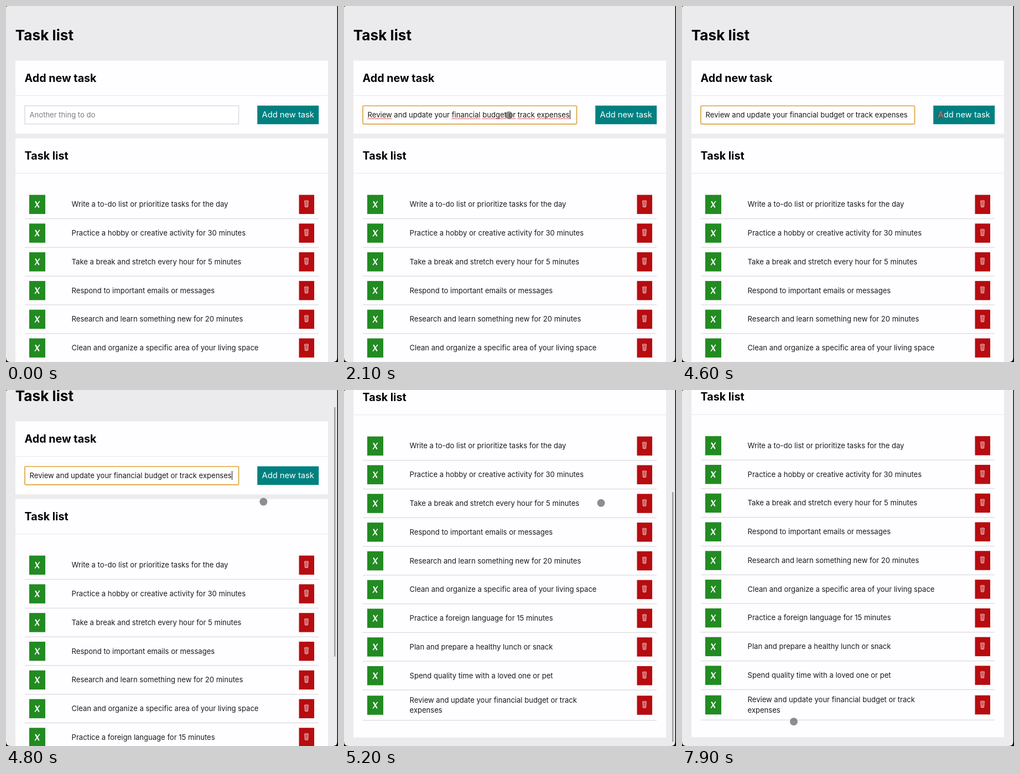
An HTML page for the animation above (8000 ms loop, 600 by 642 pixels).

```html
<!DOCTYPE html>
<html lang="en">
<head>
<meta charset="utf-8">
<title>Task list</title>
<style>
  html, body { margin: 0; width: 100%; height: 100%; overflow: hidden; background: #000; }
  svg { display: block; width: 100%; height: 100%; }
  text { font: 13.05px Inter, Roboto, sans-serif; font-optical-sizing: none; fill: #1a1a1d; white-space: pre; }
  text.h1 { font-size: 26.2px; font-weight: 700; fill: #000; }
  text.h2 { font-size: 19.7px; font-weight: 700; fill: #000; }
  text.btn { font-size: 14.7px; fill: #fff; }
</style>
</head>
<body>
<svg viewBox="0 0 600 642" preserveAspectRatio="none">
  <defs>
    <clipPath id="win"><path d="M3 0H598.6V634Q598.6 642 591 642H8Q0 642 0 634V3Q0 0 3 0Z"/></clipPath>
    <g id="cross" stroke="#fff" stroke-linecap="round" fill="none">
      <path d="M-2.9 -4.8Q-.6 -.6 2.7 4.8" stroke-width="2.3"/>
      <path d="M4 -5.4L-4 5.4" stroke-width="1.6"/>
    </g>
    <g id="bin" fill="none" stroke="#fff" stroke-width=".9" opacity=".85">
      <ellipse cy="-5" rx="3.9" ry="1.1"/>
      <path d="M-3.3 -4L-2.6 5.2Q0 6.2 2.6 5.2L3.3 -4M-1.2 -3L-.9 5M1.2 -3L.9 5"/>
    </g>
  </defs>
  <g clip-path="url(#win)">
    <rect width="600" height="642" fill="#ebeaec"/>
    <g id="page"></g>
    <rect id="thumb" x="593" width="2.4" rx="1.2" fill="#9c9c9f"/>
    <circle id="pointer" r="7" fill="#555" fill-opacity=".66"/>
  </g>
</svg>
<script>
const NS = 'http://www.w3.org/2000/svg';
const $ = id => document.getElementById(id);
const page = $('page');
const LOOP = 8000, STEP = 100, VIEW = 642, DOC = 899.4;
const ROW = 51.77, FIRST = 331.9;
const TYPED = 'Review and update your financial budget or track expenses';
const tasks = [
  'Write a to-do list or prioritize tasks for the day',
  'Practice a hobby or creative activity for 30 minutes',
  'Take a break and stretch every hour for 5 minutes',
  'Respond to important emails or messages',
  'Research and learn something new for 20 minutes',
  'Clean and organize a specific area of your living space',
  'Practice a foreign language for 15 minutes',
  'Plan and prepare a healthy lunch or snack',
  'Spend quality time with a loved one or pet'
];

function add(parent, tag, attrs, content) {
  const el = document.createElementNS(NS, tag);
  for (const k in attrs) el.setAttribute(k, attrs[k]);
  if (content) el.textContent = content;
  parent.appendChild(el);
  return el;
}
const rect = (parent, x, y, width, height, fill, more) =>
  add(parent, 'rect', { x, y, width, height, fill, ...more });
const label = (parent, x, y, content, cls = '') =>
  add(parent, 'text', { x, y, class: cls }, content);

function panel(y, height, title) {
  const box = rect(page, 17, y, 565, height, '#fefdff');
  rect(page, 17, y + 62.5, 565, 1.2, '#ebebee');
  label(page, 33.5, y + 38.4, title, 'h2');
  return box;
}

function row(top, height, lines) {
  const g = add(page, 'g', {});
  const mid = top + height / 2;
  rect(g, 42, mid - 17.2, 29, 34.5, '#228b22');
  rect(g, 529.5, mid - 17.2, 27.5, 34.5, '#b70c10');
  add(g, 'use', { href: '#cross', x: 56.5, y: mid });
  add(g, 'use', { href: '#bin', x: 543, y: mid - .8 });
  lines.forEach((s, i) =>
    label(g, 118.6, mid + 4.5 + (i - (lines.length - 1) / 2) * 18.6, s));
  rect(g, 34, top + height - .7, 531, 1.2, '#d9d9de');
  return g;
}

label(page, 16.8, 62.4, 'Task list', 'h1');
panel(98.5, 131.8, 'Add new task');
const listBox = panel(238.5, 645, 'Task list');

const field = rect(page, 34, 180, 386.5, 32.8, '#fff');
const hint = label(page, 42.6, 200.6, 'Another thing to do');
hint.style.fill = '#7c7c80';
const typed = label(page, 42.6, 200.6, TYPED);
const caret = rect(page, 43, 188, 1, 16, '#111');
rect(page, 454.2, 179.6, 111, 33.6, '#008080');
label(page, 462.6, 201.4, 'Add new task', 'btn');

tasks.forEach((s, i) => row(FIRST + i * ROW, ROW, [s]));
const added = row(FIRST + 9 * ROW, 54.8, ['Review and update your financial budget or track', 'expenses']);

const marks = add(page, 'g', { stroke: '#e0342f', 'stroke-width': 1.4, 'stroke-dasharray': '1.6 1.1' });
for (const word of ['Review', 'financial', 'budget', 'or ', 'track', 'expenses']) {
  const from = TYPED.indexOf(word);
  const last = from + word.trim().length - 1;
  add(marks, 'path', {
    d: `M${typed.getStartPositionOfChar(from).x} 203.3H${typed.getEndPositionOfChar(last).x}`
  });
}
const endX = typed.getEndPositionOfChar(TYPED.length - 1).x;

// [time, values...]
const scrollKeys = [[4700, 0], [4800, 42], [4900, 119], [5000, 190], [5100, 237], [5200, 256.8], [5400, 257.4]];
const pointerKeys = [
  [1600, 298, 197], [2600, 298, 197], [3400, 456, 196], [3900, 467, 197], [4600, 467, 197],
  [4900, 464.5, 203.8], [5900, 464.5, 203.8], [6300, 411, 371], [6800, 408, 545],
  [7300, 340, 581], [7700, 264, 595], [7900, 202, 598]
];

function at(keys, t) {
  const i = keys.findIndex(k => k[0] > t);
  if (i === 0) return keys[0].slice(1);
  if (i < 0) return keys[keys.length - 1].slice(1);
  const a = keys[i - 1], b = keys[i];
  const p = (t - a[0]) / (b[0] - a[0]);
  return a.slice(1).map((v, n) => v + (b[n + 1] - v) * p);
}
const show = (el, on) => el.setAttribute('visibility', on ? 'visible' : 'hidden');

function draw(t) {
  const focus = t >= 1800, filled = t >= 2000, done = t >= 4700;
  field.setAttribute('stroke', focus ? '#dba63c' : '#d3d3da');
  field.setAttribute('stroke-width', focus ? 1.7 : 1.2);
  field.setAttribute('rx', focus ? 1.5 : 0);
  show(hint, !filled);
  show(typed, filled);
  show(marks, filled && t < 2700);
  show(caret, focus && (t - 1800) % 1000 < 500);
  caret.setAttribute('x', filled ? endX + .3 : 43);

  show(added, done);
  listBox.setAttribute('height', done ? 645 : 590.2);
  const [scroll] = at(scrollKeys, t);
  page.setAttribute('transform', `translate(0 ${-scroll})`);
  $('thumb').setAttribute('y', scroll / DOC * VIEW + .8);
  $('thumb').setAttribute('height', VIEW * VIEW / DOC - 8);
  $('thumb').setAttribute('opacity', t < 4800 ? 0 : Math.max(0, Math.min(1, (5900 - t) / 300)));

  const [x, y] = at(pointerKeys, t);
  show($('pointer'), t >= 1600);
  $('pointer').setAttribute('cx', x);
  $('pointer').setAttribute('cy', y);
}

const start = performance.now();
function tick() {
  const t = (performance.now() - start) % LOOP;
  draw(Math.floor(t / STEP) * STEP);
  requestAnimationFrame(tick);
}
tick();
</script>
</body>
</html>
```
